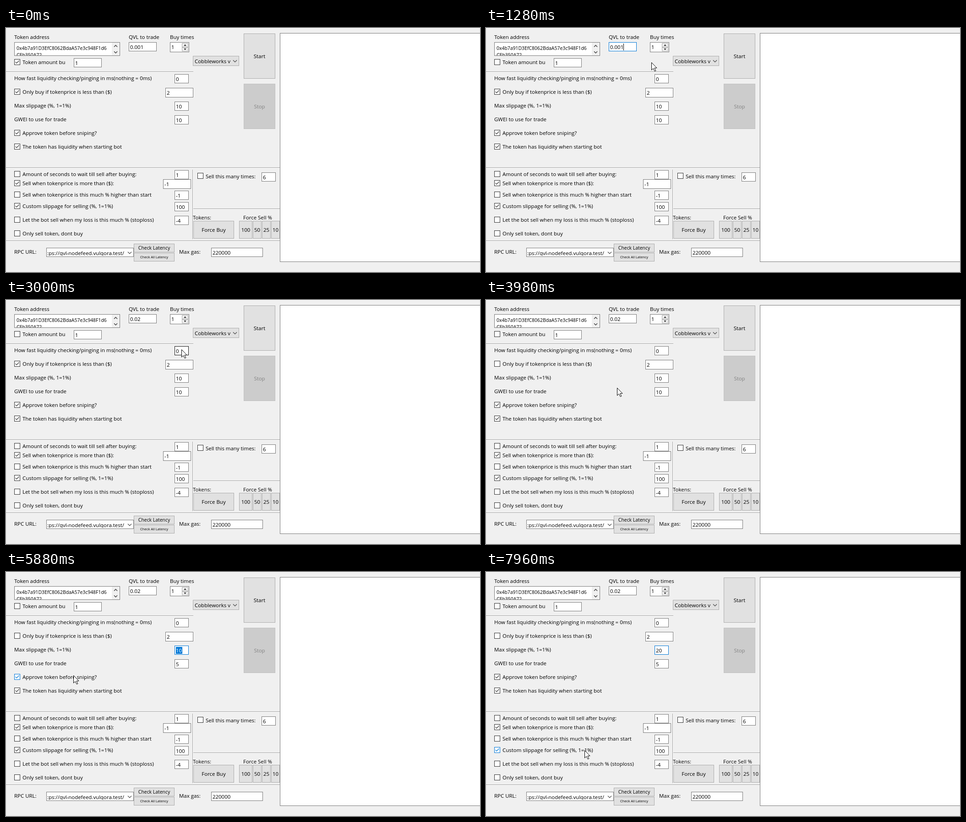
An HTML page with a canvas that plays this animation: 1035 px wide and 534 px high, repeating every 8 s.

```html
<!DOCTYPE html>
<html lang="en">
<head>
<meta charset="utf-8">
<title>Trading bot form</title>
<style>
html, body { margin: 0; width: 100%; height: 100%; overflow: hidden; background: #f0f0f0; }
canvas { display: block; }
</style>
</head>
<body>
<canvas id="stage" width="1035" height="534"></canvas>
<script>
const ctx = document.getElementById('stage').getContext('2d', { alpha: false });
const LOOP = 8000;
const TEXT = 11.45, SMALL = 10.45, TINY = 7.6;
const BLUE = '#0078d7', GREY = '#7a7a7a';

const LIST_OPEN = 1780, LIST_CLOSE = 2370;
const OPTIONS = ['Cobblew...1 (QVL)', 'Cobblew...2 (QVL)', 'Tarnlow v2 (ORN)',
  'Tarnlow v3 (ORN)', 'Fendrilo (KELM)'];

// Pointer stops: time, x, y
const PATH = [
  [100, 697, 461], [560, 110, 31], [760, 26, 73], [900, 26, 74],
  [1060, 300, 40], [1130, 300, 40], [1280, 361, 75], [1620, 493, 72],
  [1800, 493, 72], [2060, 493, 131], [2200, 487, 152], [2340, 470, 112],
  [2390, 470, 112], [2520, 395, 105], [3000, 383, 108], [3110, 360, 141],
  [3340, 24, 141], [3430, 24, 141], [4160, 332, 201], [4270, 386, 202],
  [4330, 386, 202], [4560, 111, 206], [4720, 111, 206], [4990, 366, 205],
  [5230, 386, 171], [5300, 386, 171], [5500, 300, 174], [5790, 150, 225],
  [6300, 120, 240], [6630, 125, 259], [6780, 146, 336], [7050, 200, 360],
  [7420, 300, 377], [7520, 300, 377], [7700, 385, 345], [7960, 215, 390]
];

// x, y, width, optional height and [time, value] steps; focus and select are time spans
const FIELDS = [
  { x: 268, y: 31, w: 61, values: [[0, '0.001'], [1400, '0.00'], [1470, '0.0'], [1600, '0.02']],
    focus: [1090, LIST_OPEN] },
  { x: 148, y: 66, w: 61, values: [[0, '1']] },
  { x: 368, y: 101, w: 31, values: [[0, '0']] },
  { x: 348, y: 131, w: 61, h: 21, values: [[0, '2']] },
  { x: 368, y: 161, w: 31, values: [[0, '10'], [6000, '2'], [6100, '20']],
    focus: [5270, LOOP], select: [5380, 6000] },
  { x: 368, y: 191, w: 31, values: [[0, '10'], [4720, '5']],
    focus: [4300, 5270], select: [4360, 4720] },
  { x: 368, y: 311, w: 31, values: [[0, '1']] },
  { x: 343, y: 331, w: 61, h: 21, values: [[0, '-1']] },
  { x: 368, y: 356, w: 31, values: [[0, '-1']] },
  { x: 368, y: 381, w: 31, values: [[0, '100']] },
  { x: 368, y: 411, w: 31, values: [[0, '-4']] },
  { x: 558, y: 316, w: 31, values: [[0, '6']] },
  { x: 448, y: 481, w: 113, values: [[0, '220000']] }
];

// x, centre y, label, checked, time of unchecking
const CHECKS = [
  [18, 75, 'Token amount bu', true, 800],
  [18, 140, 'Only buy if tokenprice is less than ($)', true, 3390],
  [18, 230, 'Approve token before sniping?', true],
  [18, 260, 'The token has liquidity when starting bot', true],
  [18, 320, 'Amount of seconds to wait till sell after buying:', false],
  [18, 340, 'Sell when tokenprice is more than ($):', true],
  [18, 365, 'Sell when tokenprice is this much % higher than start', false],
  [18, 390, 'Custom slippage for selling (%, 1=1%)', true],
  [18, 420, 'Let the bot sell when my loss is this much % (stoploss)', false],
  [18, 450, 'Only sell token, dont buy', false],
  [418, 324, 'Sell this many times:', false]
];

const LABELS = [
  [18, 20, 'Token address'], [268, 20, 'QVL to trade'], [358, 20, 'Buy times'],
  [18, 110, 'How fast liquidity checking/pinging in ms(nothing = 0ms)'],
  [18, 170, 'Max slippage (%, 1=1%)'], [18, 200, 'GWEI to use for trade'],
  [408, 415, 'Tokens:'], [518, 415, 'Force Sell %'],
  [18, 490, 'RPC URL:'], [378, 490, 'Max gas:']
];

const BUTTONS = [
  [519, 12, 69, 99, 'Start'], [409, 422, 89, 39, 'Force Buy'],
  [509, 422, 29, 39, '100'], [539, 422, 19, 39, '50'],
  [559, 422, 19, 39, '25'], [579, 422, 19, 39, '10'],
  [279, 472, 89, 19, 'Check Latency', SMALL], [279, 492, 89, 19, 'Check All Latency', TINY]
];

const within = (t, span) => Boolean(span) && t >= span[0] && t < span[1];
const inside = (p, x, y, w, h) => Boolean(p) && p.x >= x && p.x < x + w && p.y >= y && p.y < y + h;

function setFont(size = TEXT) {
  ctx.font = `${size}px "Open Sans", "Noto Sans", sans-serif`;
}

function write(str, x, baseline, color = '#000', size = TEXT, align = 'left') {
  setFont(size);
  ctx.textAlign = align;
  ctx.fillStyle = color;
  ctx.fillText(str, x, baseline);
}

function fill(x, y, w, h, color) {
  ctx.fillStyle = color;
  ctx.fillRect(x, y, w, h);
}

function box(x, y, w, h, face, edge) {
  fill(x, y, w, h, edge);
  fill(x + 1, y + 1, w - 2, h - 2, face);
}

function clipped(x, y, w, h, draw) {
  ctx.save();
  ctx.beginPath();
  ctx.rect(x, y, w, h);
  ctx.clip();
  draw();
  ctx.restore();
}

function polyline(points, color, width) {
  ctx.beginPath();
  points.forEach(([x, y]) => ctx.lineTo(x, y));
  ctx.strokeStyle = color;
  ctx.lineWidth = width;
  ctx.stroke();
}

// dir 1 points down, -1 points up
function chevron(x, y, dir, size = 4, width = 1.1) {
  const h = size / 2 * dir;
  polyline([[x - size, y - h], [x, y + h], [x + size, y - h]], '#444', width);
}

function spinArrow(x, y, dir) {
  ctx.beginPath();
  ctx.moveTo(x - 3, y - 1.5 * dir);
  ctx.lineTo(x + 3, y - 1.5 * dir);
  ctx.lineTo(x, y + 1.5 * dir);
  ctx.fillStyle = '#222';
  ctx.fill();
}

function groove(x, y, length, vertical) {
  const [w, h] = vertical ? [1, length] : [length, 1];
  fill(x, y, w, h, '#a0a0a0');
  fill(x + (vertical ? 1 : 0), y + (vertical ? 0 : 1), w, h, '#fff');
}

function button([x, y, w, h, label, size = TEXT], disabled) {
  box(x, y, w, h, disabled ? '#ccc' : '#e1e1e1', disabled ? '#bfbfbf' : '#adadad');
  write(label, x + w / 2, y + h / 2 + size * 0.37, disabled ? '#838383' : '#000', size, 'center');
}

function pointerAt(t) {
  if (t < PATH[0][0]) return null;
  const i = PATH.findIndex(stop => stop[0] > t);
  if (i < 0) {
    const [, x, y] = PATH[PATH.length - 1];
    return { x, y };
  }
  const [t0, x0, y0] = PATH[i - 1], [t1, x1, y1] = PATH[i];
  const u = (t - t0) / (t1 - t0), e = u * u * (3 - 2 * u);
  return { x: Math.round(x0 + (x1 - x0) * e), y: Math.round(y0 + (y1 - y0) * e) };
}

function drawField({ x, y, w, h = 20, values, focus, select }, t, pointer) {
  const [changed, value] = values.filter(step => step[0] <= t).pop();
  const focused = within(t, focus), selected = within(t, select);
  const edge = focused ? BLUE : inside(pointer, x, y, w, h) ? '#171717' : GREY;
  box(x, y, w, h, '#fff', edge);
  setFont();
  const width = ctx.measureText(value).width;
  if (selected) fill(x + 3, y + 3, Math.ceil(width), 15, BLUE);
  write(value, x + 3, y + 15, selected ? '#fff' : '#000');
  const blink = focused && (t - Math.max(focus[0], changed)) % 1000 < 500;
  if (blink && !selected) fill(Math.round(x + 3 + width), y + 3, 1, 15, '#000');
}

function drawCheck([x, cy, label, checked, clickTime = Infinity], t, pointer) {
  setFont();
  const width = 20 + ctx.measureText(label).width;
  const color = inside(pointer, x, cy - 10, width, 20) ? BLUE : '#333';
  box(x, cy - 7, 13, 13, '#fff', color);
  if (checked && t < clickTime) {
    polyline([[x + 2.5, cy - 0.7], [x + 5.2, cy + 2], [x + 10.5, cy - 3.5]], color, 1.2);
  }
  write(label, x + 18, cy + (x > 400 ? 5 : 4));
}

function drawAddress() {
  box(18, 31, 231, 30, '#fff', GREY);
  clipped(19, 32, 211, 28, () => {
    write('0x4b7a91D3EfC8062BdaA57e3c948F1d6', 23, 48, '#000', SMALL);
    write('CEb350A72', 23, 63, '#000', SMALL);
  });
  fill(231, 32, 17, 28, '#f0f0f0');
  chevron(239.5, 39.5, -1, 3.5, 1.5);
  chevron(239.5, 53, 1, 3.5, 1.5);
}

function drawSpinner() {
  box(358, 31, 42, 22, '#fff', GREY);
  write('1', 361, 46);
  box(384, 33, 14, 9, '#f0f0f0', '#adadad');
  box(384, 42, 14, 9, '#f0f0f0', '#adadad');
  spinArrow(391, 37.5, -1);
  spinArrow(391, 46.5, 1);
}

function drawExchange(open, pointer) {
  const hover = inside(pointer, 408, 61, 101, 22);
  const [face, edge] = open ? ['#cce4f7', '#005499'] : hover ? ['#e5f1fb', BLUE] : ['#e1e1e1', '#adadad'];
  box(408, 61, 101, 22, face, edge);
  clipped(410, 62, 80, 20, () => write('Cobbleworks v2 (QVL)', 412, 77));
  chevron(500, 72.5, 1);
}

function drawOptions(pointer) {
  const x = 408, y = 82, w = 101, h = 92;
  for (let spread = 3; spread > 0; spread--) {
    fill(x + 3, y + 3, w - 3 + spread, h - 3 + spread, 'rgba(0,0,0,.2)');
  }
  box(x, y, w, h, '#fff', '#646464');
  OPTIONS.forEach((name, i) => {
    const top = y + 1 + i * 18;
    if (inside(pointer, x, top, w, 18)) box(x + 1, top, w - 2, 18, '#cce8ff', '#99d1ff');
    write(name, x + 4, top + 14);
  });
}

function drawServer() {
  box(88, 481, 191, 20, '#fff', GREY);
  clipped(90, 484, 170, 14.5, () => write(':ps://qvl-nodefeed.vulqora.test/', 90, 497));
  chevron(270, 492, 1);
}

function drawPointer({ x, y }) {
  const shape = [[0, 0], [0, 16.5], [3.8, 13], [6.8, 19], [9.3, 18], [6.5, 12], [11.5, 12]];
  ctx.beginPath();
  shape.forEach(([dx, dy]) => ctx.lineTo(x + 0.5 + dx, y + 0.5 + dy));
  ctx.closePath();
  ctx.fillStyle = '#fff';
  ctx.fill();
  ctx.strokeStyle = '#000';
  ctx.lineWidth = 1;
  ctx.stroke();
}

function draw(t) {
  const pointer = pointerAt(t);
  const open = within(t, [LIST_OPEN, LIST_CLOSE]);
  const hot = open ? null : pointer;

  fill(0, 0, 1035, 534, '#f0f0f0');
  fill(0, 0, 1035, 1, '#fff');
  groove(0, 95, 409);
  groove(0, 305, 598);
  groove(0, 465, 598);
  groove(408, 395, 190);
  groove(407, 310, 152, true);
  box(598, 11, 450, 501, '#fff', GREY);

  LABELS.forEach(([x, cy, label]) => write(label, x, cy + 4));
  drawAddress();
  drawSpinner();
  CHECKS.forEach(check => drawCheck(check, t, hot));
  FIELDS.forEach(field => drawField(field, t, hot));
  BUTTONS.forEach(item => button(item));
  button([519, 122, 69, 99, 'Stop'], true);
  drawServer();
  drawExchange(open, hot);
  if (open) drawOptions(pointer);
  if (pointer) drawPointer(pointer);
}

function tick() {
  draw(performance.now() % LOOP);
  requestAnimationFrame(tick);
}
tick();
</script>
</body>
</html>
```
